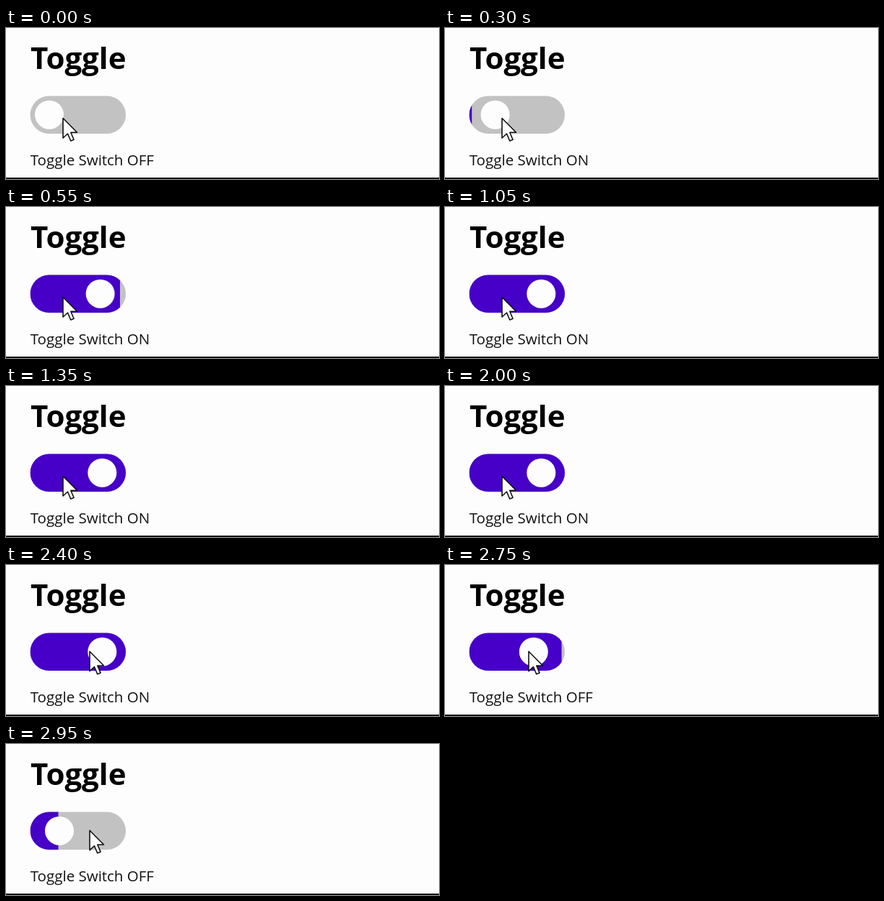
Recreate the animation shown at these times as an HTML page. Size 600 px wide and 210 px high, loop 3 s.

```html
<!DOCTYPE html>
<html lang="en">
<head>
<meta charset="utf-8">
<title>Toggle</title>
<style>
  html, body { margin: 0; width: 100%; height: 100%; overflow: hidden; background: #fdfdfd; }
  svg { display: block; }
  text { font-family: "Open Sans", "Noto Sans", sans-serif; }
</style>
</head>
<body>
<svg width="600" height="210" viewBox="0 0 600 210">
  <clipPath id="pill"><rect x="33.5" y="94.5" width="132.5" height="52.5" rx="26.25"/></clipPath>
  <text x="34" y="56.5" font-size="42" font-weight="700">Toggle</text>
  <g clip-path="url(#pill)">
    <rect x="33" y="94" width="134" height="54" fill="#c2c2c2"/>
    <rect id="fill" x="33.5" y="94" height="54" fill="#4600c8"/>
  </g>
  <circle id="knob" cy="120.7" r="20" fill="#fdfdfd"/>
  <text id="label" x="33.7" y="191" font-size="20.5" fill="#111"></text>
  <rect y="208" width="600" height="2" fill="#111"/>
  <path id="cursor" d="M0 0V27.5L6.5 21.5L10.7 31.5L15 29.7L10.8 19.8H19.5Z"
        fill="#fff" stroke="#111" stroke-width="1.6" stroke-linejoin="round"/>
</svg>
<script>
const $ = id => document.getElementById(id);
const LOOP = 3000, ON_AT = 262, OFF_AT = 2708, SLIDE = 300;
const MOVE_AT = 2050, MOVE = 300;

const ramp = (t, start, length) => Math.min(1, Math.max(0, (t - start) / length));
const smooth = p => p * p * (3 - 2 * p);

// cubic-bezier(.42, 0, 1, 1), solved by bisection
function easeIn(p) {
  let lo = 0, hi = 1;
  for (let i = 0; i < 24; i++) {
    const s = (lo + hi) / 2, r = 1 - s;
    const x = 1.26 * r * r * s + 3 * r * s * s + s ** 3;
    if (x < p) lo = s; else hi = s;
  }
  return lo * lo * (3 - 2 * lo);
}

function draw(t) {
  const on = ramp(t, ON_AT, SLIDE), off = ramp(t, OFF_AT, SLIDE);
  const move = smooth(ramp(t, MOVE_AT, MOVE));
  $("knob").setAttribute("cx", 60 + 73.3 * (on - off));
  $("fill").setAttribute("width", 132.5 * (easeIn(on) - easeIn(off)));
  $("label").textContent = "Toggle Switch " + (t >= ON_AT && t < OFF_AT ? "ON" : "OFF");
  $("cursor").setAttribute("transform", `translate(${79 + 37 * move} ${125.5 - 5.3 * move})`);
}

const start = performance.now();
function tick() {
  draw((performance.now() - start) % LOOP);
  requestAnimationFrame(tick);
}
tick();
</script>
</body>
</html>
```
